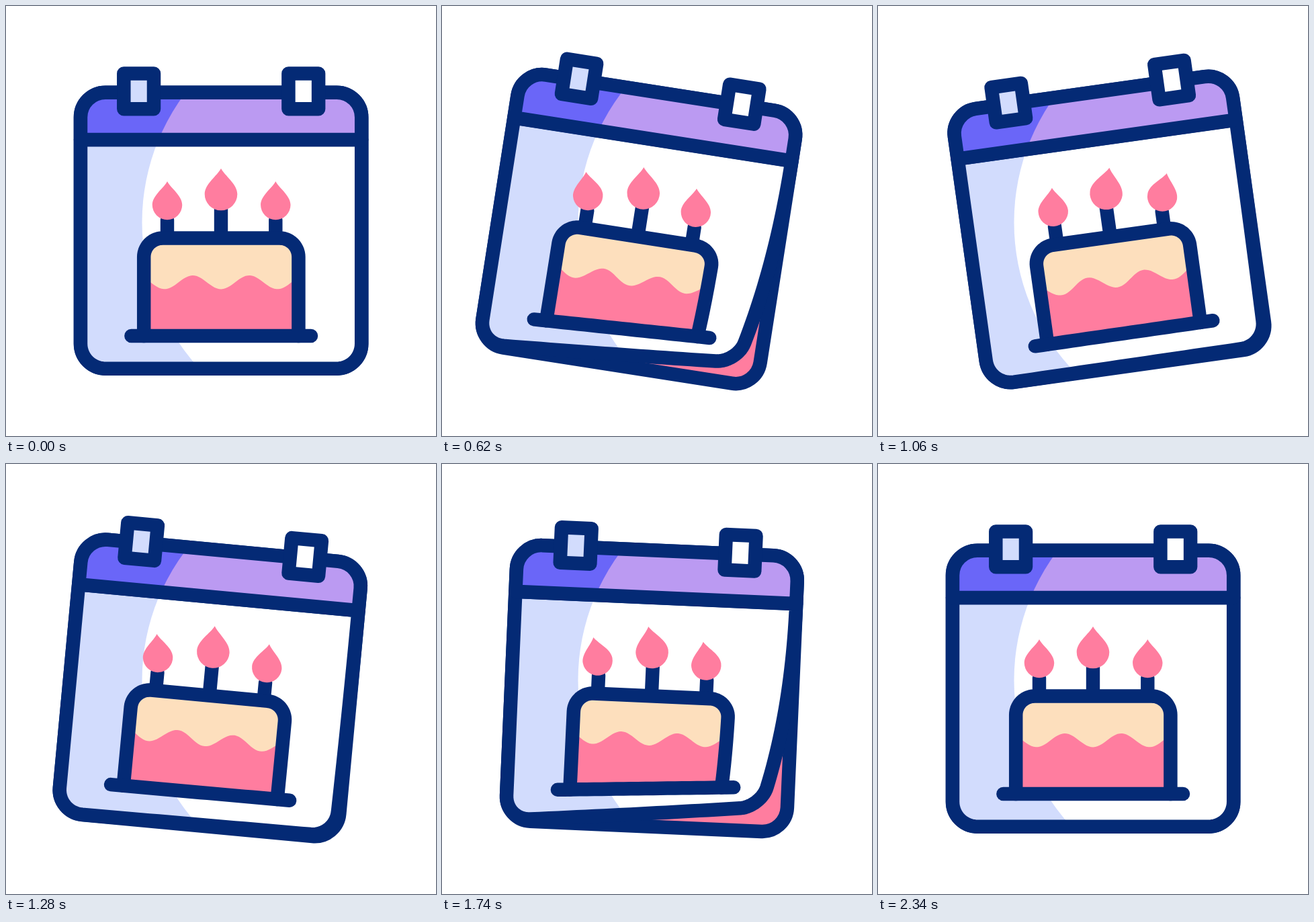
Recreate the animation shown at these times as an HTML page with a canvas. Size 640x640 px, loop 2.4 s.

```html
<!DOCTYPE html>
<html lang="en">
<head>
<meta charset="utf-8">
<title>Birthday calendar</title>
<style>
  html, body { margin: 0; width: 100%; height: 100%; overflow: hidden; background: #fff; }
  canvas { display: block; width: 640px; height: 640px; }
</style>
</head>
<body>
<canvas id="stage" width="640" height="640"></canvas>
<script>
const ctx = document.getElementById('stage').getContext('2d');
const LOOP = 2400, LINE = 20.5, TAU = Math.PI * 2;
const PIVOT = { x: 320, y: 159 };
const NAVY = '#042a75', PINK = '#ff7d9f', CREAM = '#fddfbd', YELLOW = '#ffcb52';
const PAPER = ['#ffffff', '#d2dcfd'], HEADER = ['#bb9af2', '#6a66f8'];

// [time, value] keys, eased in and out between neighbours
const SWING = [[0, 0], [600, 9], [1000, -9], [1400, 9], [1600, -4.2], [1800, 4.2], [2000, -4.2], [2220, 0]];
const CURL = [[0, 0], [600, 1], [1160, 0], [1820, 1.18], [2160, 0]];
const HEAD = [[1840, 0], [2140, 1]];
const TAIL = [[1940, 0], [2260, 1]];
const flameKeys = (a, b, c) => [[0, 0], [620, a], [1050, b], [1480, c], [2200, 0]];
const CANDLES = [
  { x: 240, y: 296, size: 0.915, keys: flameKeys(-13.5, 5, -18) },
  { x: 320, y: 280, size: 1, keys: flameKeys(-8, 15, -15) },
  { x: 401.3, y: 296, size: 0.915, keys: flameKeys(-7, 19, -14) }
];

const ease = k => 0.5 - 0.5 * Math.cos(Math.PI * k);
const rad = deg => deg * Math.PI / 180;

function at(keys, t) {
  const i = keys.findIndex(k => k[0] > t);
  if (i < 0) return keys[keys.length - 1][1];
  if (i === 0) return keys[0][1];
  const [t0, a] = keys[i - 1], [t1, b] = keys[i];
  return a + (b - a) * ease((t - t0) / (t1 - t0));
}

function line(x0, y0, x1, y1, n = 24) {
  return Array.from({ length: n + 1 }, (_, i) => [x0 + (x1 - x0) * i / n, y0 + (y1 - y0) * i / n]);
}

function arc(cx, cy, r, from, to, n = 14) {
  return Array.from({ length: n + 1 }, (_, i) => {
    const a = rad(from + (to - from) * i / n);
    return [cx + r * Math.cos(a), cy + r * Math.sin(a)];
  });
}

function trace(points, warp, close) {
  const path = new Path2D();
  points.forEach(p => path.lineTo(...warp(p)));
  if (close) path.closePath();
  return path;
}

function roundRect(x, y, w, h, r) {
  const path = new Path2D();
  path.roundRect(x, y, w, h, r);
  return path;
}

function stroke(path, color = NAVY, width = LINE) {
  ctx.strokeStyle = color;
  ctx.lineWidth = width;
  ctx.stroke(path);
}

function fill(path, color) {
  ctx.fillStyle = color;
  ctx.fill(path);
}

// The light circle stays fixed on the stage while the shape swings.
function shade(path, [light, dark]) {
  fill(path, dark);
  ctx.save();
  ctx.clip(path);
  ctx.resetTransform();
  ctx.beginPath();
  ctx.arc(523, 322, 320.5, 0, TAU);
  ctx.fillStyle = light;
  ctx.fill();
  ctx.restore();
}

function drawPage(curl) {
  const warp = ([x, y]) => {
    const u = (x - 111) / 418, v = (y - 199) / 341, k = curl * v * v;
    return [x - 35 * k * u * u, y - 32 * k * u];
  };
  const page = trace([
    ...line(529.2, 199, 529.2, 502.7),
    ...arc(492.2, 502.7, 37, 0, 90),
    ...line(492.2, 539.7, 148, 539.7),
    ...arc(148, 502.7, 37, 90, 180),
    ...line(111, 502.7, 111, 199)
  ], warp, true);
  shade(page, PAPER);
  stroke(page);
}

function drawCandle({ x, y, size, keys }, t) {
  fill(roundRect(x - 10.2, y + 15, 20.4, 345 - y - 15, 7), NAVY);
  ctx.save();
  ctx.translate(x, y + 11);
  ctx.rotate(rad(at(keys, t)));
  ctx.translate(0, -11);
  ctx.scale(size, size);
  fill(new Path2D('M0-38.3C6-27 24.3-15 24.3 0A24.3 24.3 0 0 1-24.3 0C-24.3-15-6-27 0-38.3Z'), PINK);
  ctx.restore();
}

function drawCake(curl) {
  const warp = ([x, y]) => {
    const s = Math.max(0, (y - 340) / 151), k = curl * s * s * (x - 186) / 268;
    return [x - 5 * k, y - 13.2 * k];
  };
  const body = [
    ...line(205.2, 491, 205.2, 373.5),
    ...arc(233.2, 373.5, 28, 180, 270),
    ...arc(407.4, 373.5, 28, 270, 360),
    ...line(435.4, 373.5, 435.4, 491)
  ];
  const wave = line(205.2, 0, 435.4, 0, 70)
    .map(([x]) => [x, 411.2 + 10.2 * Math.cos((x - 236) * TAU / 84)]);
  fill(trace(body, warp, true), CREAM);
  fill(trace([...wave, [435.4, 491], [205.2, 491]], warp, true), PINK);
  stroke(trace(body, warp));
  stroke(trace(line(186.4, 491, 454, 491), warp));
}

function drawHeader() {
  const top = roundRect(111, 128.7, 418.2, 70.2, [37, 37, 0, 0]);
  shade(top, HEADER);
  stroke(top);
  for (const x of [175.3, 420.4]) {
    const hook = new Path2D();
    hook.rect(x, 100.5, 44.7, 52.7);
    shade(hook, PAPER);
    stroke(hook);
  }
}

function drawSparks(t) {
  const head = at(HEAD, t), tail = at(TAIL, t);
  if (head - tail < 0.01) return;
  for (const side of [-1, 1]) {
    const point = k => [320 + side * (123 + 38 * k), 287.3 - 39.9 * k];
    stroke(trace([point(tail), point(head)], p => p), YELLOW, 19.5);
  }
}

function draw(now) {
  const t = now % LOOP, curl = at(CURL, t);
  ctx.resetTransform();
  ctx.fillStyle = '#fff';
  ctx.fillRect(0, 0, 640, 640);
  ctx.lineCap = ctx.lineJoin = 'round';

  ctx.translate(PIVOT.x, PIVOT.y);
  ctx.rotate(rad(at(SWING, t)));
  ctx.translate(-PIVOT.x, -PIVOT.y);

  const back = roundRect(111, 128.7, 418.2, 411, 37);
  fill(back, PINK);
  stroke(back);
  drawPage(curl);
  CANDLES.forEach(c => drawCandle(c, t));
  drawCake(curl);
  drawHeader();

  ctx.resetTransform();
  drawSparks(t);
}

const start = performance.now();
function tick() {
  draw(performance.now() - start);
  requestAnimationFrame(tick);
}
tick();
</script>
</body>
</html>
```
